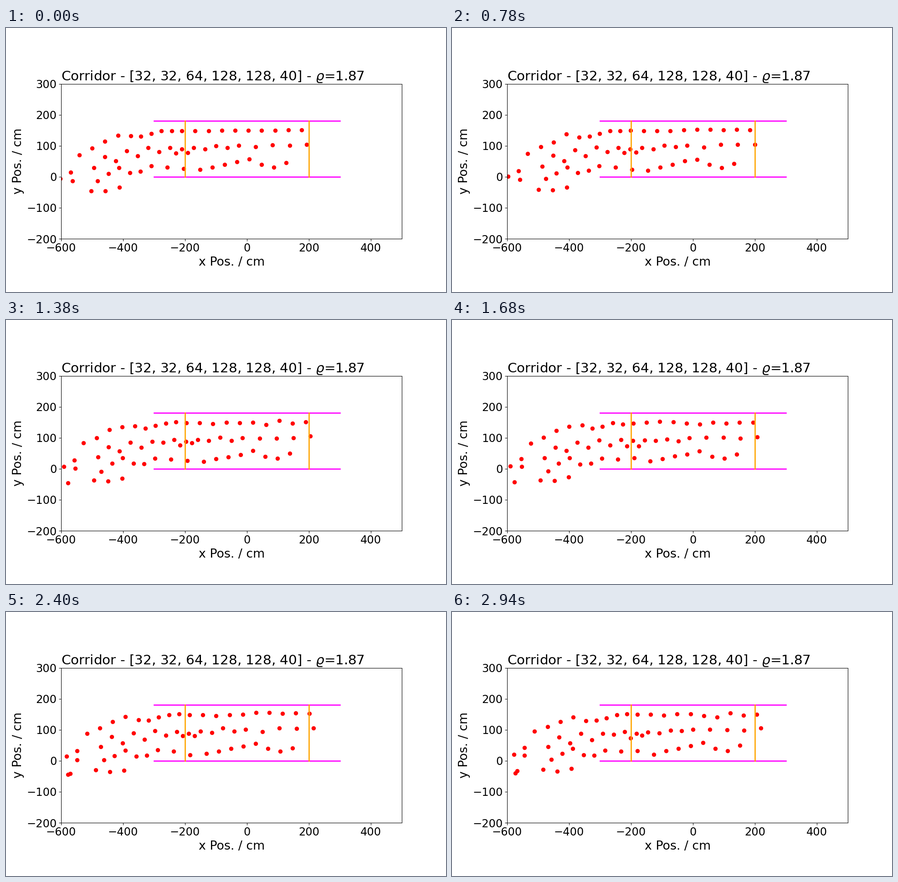
A matplotlib script that plays this animation: 966 by 580 pixels, repeating every 3000 ms.

```python
import numpy as np
import matplotlib.pyplot as plt
from matplotlib.animation import FuncAnimation

FRAMES, STEP = 50, 60
LAST = (FRAMES - 1) * STEP
rng = np.random.default_rng(4)


def lane(order, path, travel, stagger=0):
    """Columns x, y, travel, entry time of the walkers along one lane.

    order: (index, x) keys that space the walkers; path: (x, y) keys.
    """
    idx = np.arange(order[-1][0] + 1)
    x = np.interp(idx, *zip(*order))
    y = np.interp(x, *zip(*path))
    y -= stagger * (-1.0) ** idx * (1 - idx / idx[-1])
    return np.column_stack([x, y, np.full(len(x), travel), np.zeros(len(x))])


walkers = np.vstack([
    lane([(0, -541), (4, -375), (9, -210), (12, -81), (18, 176)],
         [(-541, 70), (-420, 134), (-337, 131), (-276, 148), (176, 151)],
         travel=30),
    lane([(0, -494), (7, -248), (11, -172), (15, -27), (19, 192)],
         [(-494, 42), (-388, 73), (-284, 89), (-204, 82), (-135, 95),
          (192, 104)],
         travel=27, stagger=13),
    lane([(0, -603), (1, -569), (2, -482), (7, -309), (10, -152), (17, 126)],
         [(-603, -6), (-569, 14), (-482, -13), (-415, 31), (-366, 7),
          (-309, 35), (-152, 23), (17, 59), (68, 25), (126, 45)],
         travel=25),
    lane([(0, -563), (1, -503), (3, -412)],
         [(-563, -13), (-503, -46), (-458, -46), (-412, -34)],
         travel=19),
    # Two walkers join the queue later.
    [(-579, -50, 19, entry) for entry in (1140, 2100)],
])
x0, y0, travel, entry = walkers.T
climb = np.interp(x0, [-570, -350], [26, 0])
sway = rng.normal(0, 4, len(x0))
rate = 2 * np.pi * rng.uniform(0.4, 0.9, len(x0)) / 1000

fig, ax = plt.subplots(figsize=(10, 6.0042), dpi=96.6)
ax.set(xlim=(-600, 500), ylim=(-200, 300), aspect="equal")
ax.set_title(r"Corridor - [32, 32, 64, 128, 128, 40] - $\varrho$=1.87",
             loc="left", fontsize=22)
ax.set_xlabel("x Pos. / cm", fontsize=20)
ax.set_ylabel("y Pos. / cm", fontsize=20)
ax.tick_params(labelsize=18)

for y in (0, 180):
    ax.plot([-300, 300], [y, y], color="magenta", lw=2)
for x in (-200, 200):
    ax.plot([x, x], [0, 180], color="orange", lw=2)
dots = ax.scatter([], [], s=36, color="red", zorder=1)


def update(i):
    t = i * STEP - entry
    x = x0 + travel * t / LAST
    y = y0 + climb * t / LAST + sway * np.sin(rate * t)
    dots.set_offsets(np.column_stack([x, y])[t >= 0])
    return (dots,)


anim = FuncAnimation(fig, update, frames=FRAMES, interval=STEP,
                     repeat=True, repeat_delay=0)
plt.show()
```
